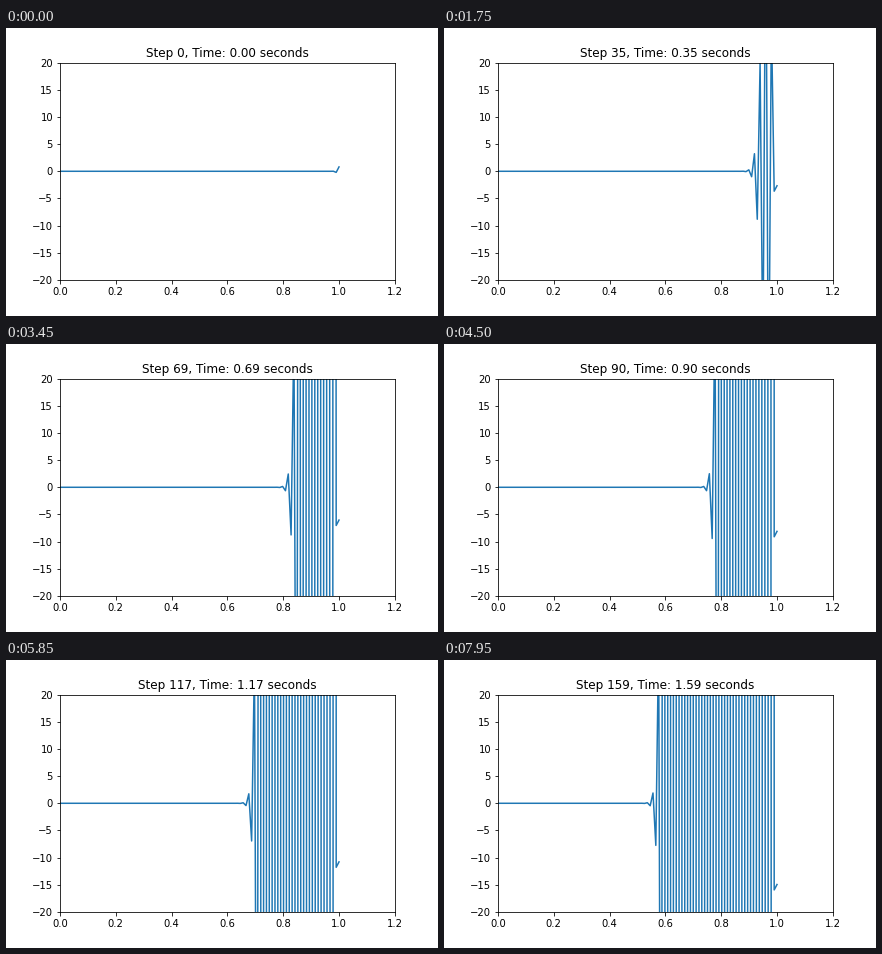
A matplotlib script for the animation above (8000 ms loop, 432 by 288 pixels).

```python
import numpy as np
import matplotlib.pyplot as plt
from matplotlib.animation import FuncAnimation

plt.rcParams["font.family"] = "DejaVu Sans"

POINTS, FRAMES, INTERVAL = 100, 160, 50
SPEED, DT = 0.1, 0.01
WARMUP = 2  # steps already taken when the first frame appears

x = np.linspace(0, 1, POINTS)
ratio = SPEED * DT / (x[1] - x[0])


def advance(u):
    """One explicit step with forward differences (unstable on purpose)."""
    slope = np.diff(u)
    return u - ratio * np.append(slope, slope[-1])


def solve(steps):
    u = np.zeros(POINTS)
    u[-1] = 1.0
    states = [u]
    for _ in range(steps):
        states.append(advance(states[-1]))
    return states


states = solve(FRAMES + WARMUP)

fig, ax = plt.subplots(figsize=(6, 4), dpi=72, facecolor="white")
fig.subplots_adjust(left=0.125, right=0.9, bottom=0.125, top=0.88)
ax.set_xlim(0, 1.2)
ax.set_ylim(-20, 20)
line, = ax.plot(x, states[WARMUP], color="#1f77b4", lw=1.5)
title = ax.set_title("", fontsize=12)


def draw(step):
    line.set_ydata(states[step + WARMUP])
    title.set_text(f"Step {step}, Time: {step * DT:.2f} seconds")
    return line, title


anim = FuncAnimation(fig, draw, frames=FRAMES, interval=INTERVAL,
                     init_func=lambda: draw(0), repeat=True, repeat_delay=0)
plt.show()
```
